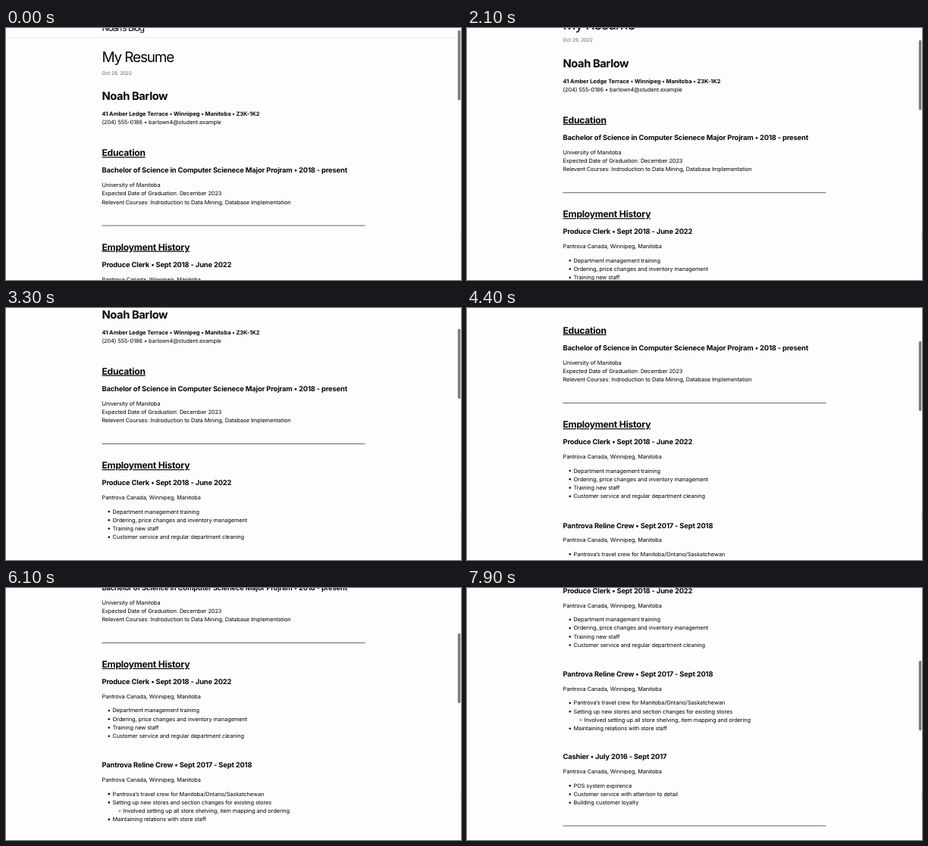
Write an HTML page that moves like this. It is 600 by 333 pixels and loops after 8000 ms.

```html
<!DOCTYPE html>
<html lang="en">
<head>
<meta charset="utf-8">
<title>My Resume</title>
<style>
  html, body { margin: 0; width: 100%; height: 100%; overflow: hidden; background: #fdfdfd; }
  svg { display: block; width: 600px; height: 333px; }
  text { font-family: Inter, "Open Sans", sans-serif; fill: #080808; text-rendering: geometricPrecision; }
  .site { font-size: 11.9px; letter-spacing: -.085em; }
  .title { font-size: 19px; letter-spacing: -.062em; }
  .date { font-size: 6.5px; letter-spacing: -.01em; fill: #666; }
  .name { font-size: 14.7px; font-weight: 700; letter-spacing: -.028em; }
  .section { font-size: 12.1px; font-weight: 700; letter-spacing: -.02em;
    text-decoration: underline; text-decoration-thickness: .9px; text-underline-offset: 1.6px; }
  .role { font-size: 9.34px; font-weight: 700; letter-spacing: -.0165em; }
  .body { font-size: 7.36px; letter-spacing: -.01em; fill: #000; }
  .strong { font-size: 7.45px; font-weight: 700; letter-spacing: -.004em; }
</style>
</head>
<body>
<svg viewBox="0 0 600 333">
  <rect width="600" height="333" fill="#fdfdfd"/>
  <g id="page"></g>
  <rect x="599" y="272" width="1" height="8" fill="#e2e2e2"/>
  <rect id="thumb" x="595.8" width="3.5" height="92.5" rx="1.75" fill="#7c7c7c"/>
</svg>
<script>
const page = document.getElementById('page');
const thumb = document.getElementById('thumb');
const LEFT = 126.5, LINE = 11.25, INDENT = 14;

function add(tag, attrs, content) {
  const el = document.createElementNS('http://www.w3.org/2000/svg', tag);
  for (const key in attrs) el.setAttribute(key, attrs[key]);
  if (content) el.textContent = content;
  page.appendChild(el);
}

function write(style, y, content, x = LEFT) {
  add('text', { class: style, x, y }, content);
}

function rule(y) {
  add('rect', { x: LEFT, y: y - 0.4, width: 347, height: 0.8, fill: '#444' });
}

// Items starting with ">" are nested one level.
function list(y, items) {
  items.forEach((item, i) => {
    const nested = item[0] === '>';
    const x = LEFT + INDENT * (nested ? 2 : 1);
    const base = y + i * LINE;
    const look = nested
      ? { r: 1.15, fill: 'none', stroke: '#111', 'stroke-width': 0.5 }
      : { r: 1.3, fill: '#111' };
    add('circle', { cx: x - 4.7, cy: base - 2.4, ...look });
    write('body', base, nested ? item.slice(1) : item, x);
  });
}

function job(y, role, items) {
  write('role', y, role);
  write('body', y + 18.9, 'Pantrova Canada, Winnipeg, Manitoba');
  list(y + 37.2, items);
}

write('site', 4, 'Noah\u2019s Blog');
add('rect', { x: 0, y: 12, width: 600, height: 0.8, fill: '#e6e6e6' });
write('title', 45, 'My Resume');
write('date', 61.6, 'Oct 29, 2022');
write('name', 95.1, 'Noah Barlow');
write('strong', 116.1, '41 Amber Ledge Terrace • Winnipeg • Manitoba • Z3K-1K2');
write('body', 127.3, '(204) 555-0186 • barlown4@student.example');

write('section', 169.2, 'Education');
write('role', 191.4, 'Bachelor of Science in Computer Scienece Major Projram • 2018 - present');
[
  'University of Manitoba',
  'Expected Date of Graduation: December 2023',
  'Relevent Courses: Indroduction to Data Mining, Database Implementation'
].forEach((s, i) => write('body', 210.2 + i * LINE, s));
rule(261.1);

write('section', 293.6, 'Employment History');
job(315.8, 'Produce Clerk • Sept 2018 - June 2022', [
  'Department management training',
  'Ordering, price changes and inventory management',
  'Training new staff',
  'Customer service and regular department cleaning'
]);
job(426, 'Pantrova Reline Crew • Sept 2017 - Sept 2018', [
  'Pantrova\u2019s travel crew for Manitoba/Ontario/Saskatchewan',
  'Setting up new stores and section changes for existing stores',
  '>Involved setting up all store shelving, item mapping and ordering',
  'Maintaining relations with store staff'
]);
job(535.2, 'Cashier • July 2016 - Sept 2017', [
  'POS system expirence',
  'Customer service with attention to detail',
  'Building customer loyalty'
]);
rule(623);

// Each flick: start in ms, number of ticks, distance scrolled.
const LOOP = 8000, TICK = 100;
const flicks = [
  [100, 8, 16.4], [1300, 9, 27], [2500, 9, 38.1], [3800, 7, 54],
  [4900, 8, 46.3], [6100, 8, 64.2], [7200, 8, 62.8]
];

const glide = u => 1 - Math.pow(1 - Math.pow(u, 1.5), 2.5);

function scrollAt(t) {
  return flicks.reduce((sum, [start, ticks, dist]) => {
    const n = Math.floor((t - start) / TICK) + 1;
    return sum + dist * glide(Math.min(Math.max(n / ticks, 0), 1));
  }, 0);
}

function draw(now) {
  const y = scrollAt(now % LOOP);
  page.setAttribute('transform', `translate(0 ${-y})`);
  thumb.setAttribute('y', 3 + y * 0.301);
  requestAnimationFrame(draw);
}
draw(performance.now());
</script>
</body>
</html>
```
